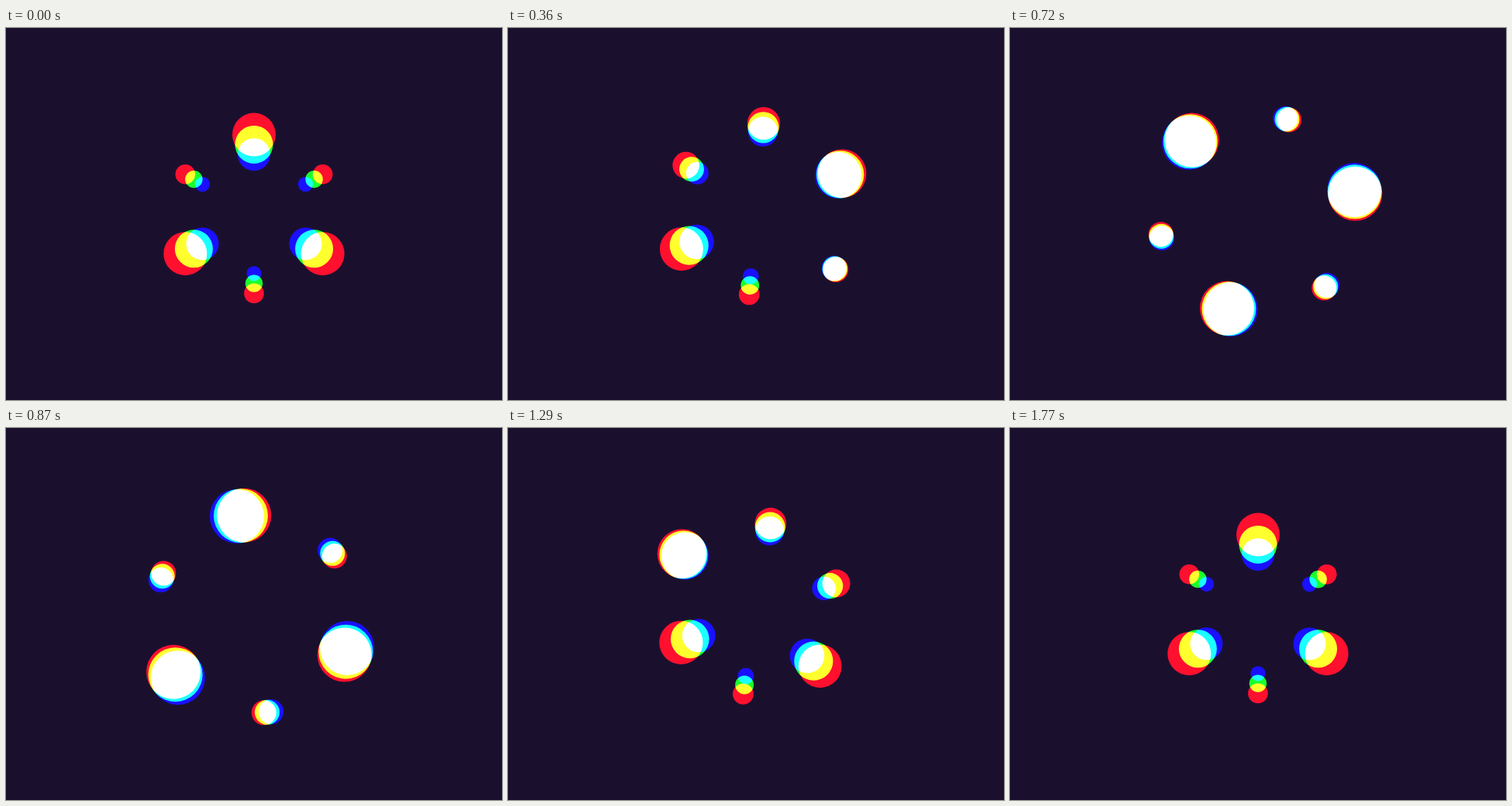
Write an HTML page with a canvas that moves like this. It is 640 px wide and 480 px high and loops after 1800 ms.

```html
<!DOCTYPE html>
<html lang="en">
<head>
<meta charset="utf-8">
<title>Orbiting dots</title>
<style>
html, body { margin: 0; width: 100%; height: 100%; overflow: hidden; background: #1a102e; }
canvas { display: block; }
</style>
</head>
<body>
<canvas id="stage" width="640" height="480"></canvas>
<script>
const ctx = document.getElementById('stage').getContext('2d');
const LOOP = 1800, HALF = LOOP / 2;
const ORBIT = 128, BIG = 35, SMALL = 16;
const RAD = Math.PI / 180;

// Each light has its own resting scale and spin duration
const lights = [
  { color: '#f00', rest: 0.8, spin: 950 },
  { color: '#0f0', rest: 0.7, spin: 850 },
  { color: '#00f', rest: 0.6, spin: 750 }
];

const mix = (a, b, p) => a + (b - a) * p;
const quad = u => u < 0.5 ? 2 * u * u : 1 - 2 * (1 - u) ** 2;

// Exponential ease in and out around a midpoint in time
function expo(t, mid, duration) {
  const u = (t - mid) / duration;
  if (u <= -0.5) return 0;
  if (u >= 0.5) return 1;
  return u < 0 ? 0.5 * 2 ** (20 * u) : 1 - 0.5 * 2 ** (-20 * u);
}

// Rises in the first half of the loop, falls the same way in the second
const pulse = (t, mid, duration) =>
  expo(t, mid, duration) - expo(t, mid + HALF, duration);

function draw(t) {
  ctx.setTransform(1, 0, 0, 1, 0, 0);
  ctx.globalCompositeOperation = 'source-over';
  ctx.fillStyle = '#1a102e';
  ctx.fillRect(0, 0, 640, 480);
  ctx.translate(320, 240);
  ctx.globalCompositeOperation = 'screen';

  const sway = 15 * quad(1 - Math.abs(t - HALF) / HALF);
  for (const { color, rest, spin } of lights) {
    const turn = sway + 120 * expo(t, HALF, spin);
    ctx.fillStyle = color;
    for (let k = 0; k < 6; k++) {
      const mid = 310 + 22.5 * ((8 - k) % 6);
      const scale = mix(rest, 1, pulse(t, mid, 450));
      const swap = pulse(t, mid, 275);
      const size = k % 2 ? mix(SMALL, BIG, swap) : mix(BIG, SMALL, swap);
      const angle = (60 * k + turn) * RAD;
      ctx.beginPath();
      ctx.arc(ORBIT * scale * Math.sin(angle), -ORBIT * scale * Math.cos(angle),
        size * scale, 0, 2 * Math.PI);
      ctx.fill();
    }
  }
}

const start = performance.now();
function tick() {
  draw((performance.now() - start) % LOOP);
  requestAnimationFrame(tick);
}
tick();
</script>
</body>
</html>
```
